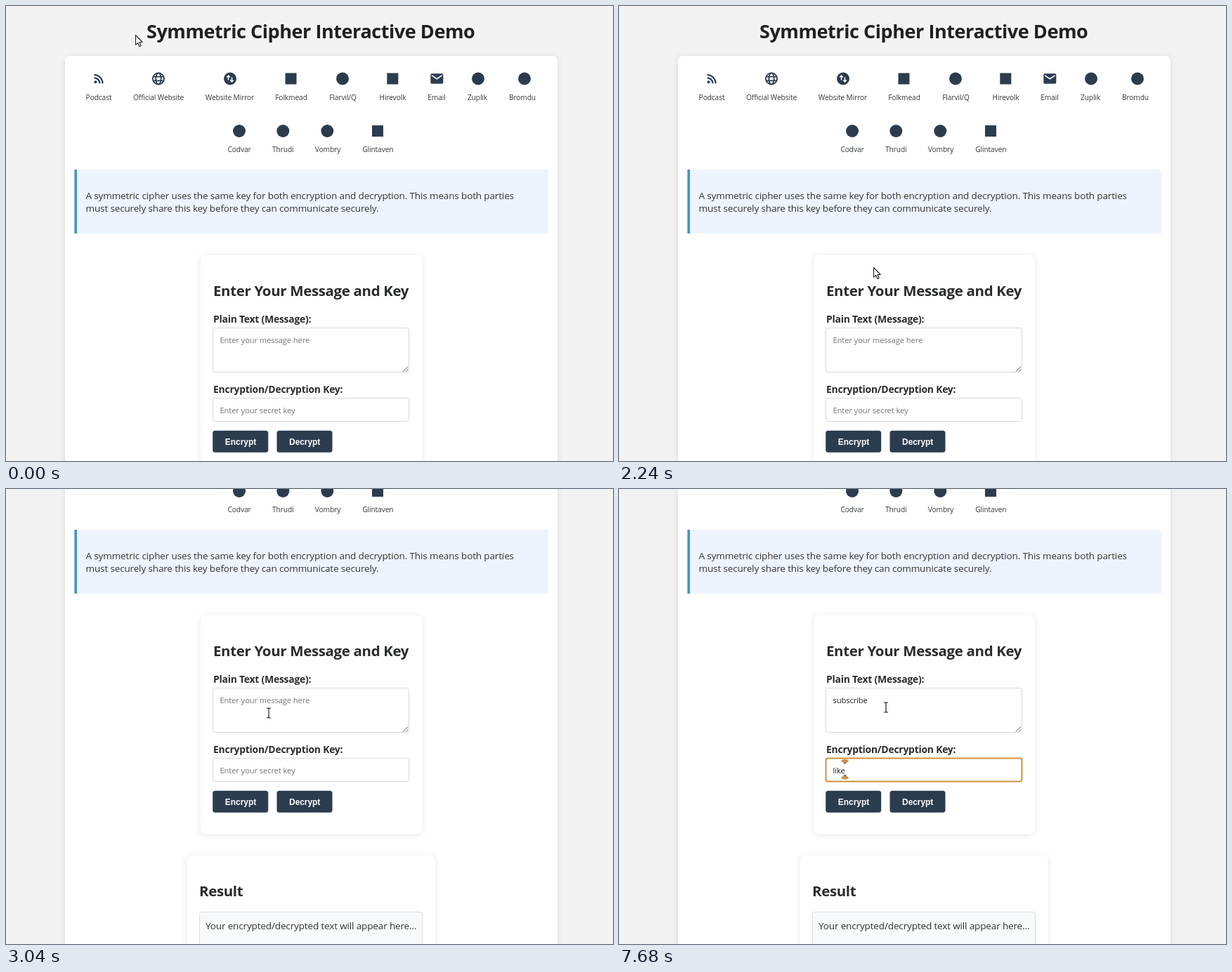
Write an HTML page that moves like this. It is 864 by 648 pixels and loops after 8 s.

```html
<!DOCTYPE html>
<html lang="en">
<head>
<meta charset="utf-8">
<title>Symmetric Cipher Interactive Demo</title>
<style>
  html, body { margin: 0; width: 100%; height: 100%; overflow: hidden; background: #f3f3f3; }
  svg { display: block; }
  text { font-family: "Open Sans", "Noto Sans", sans-serif; letter-spacing: -.01em; fill: #333; white-space: pre; }
  .title, .head, .label { font-weight: 700; letter-spacing: -.016em; fill: #2a2b2d; }
  .title { font-size: 27px; fill: #1f2023; }
  .head { font-size: 20.45px; }
  .label { font-size: 13.9px; }
  .body { font-size: 13.5px; }
  .tiny { font-size: 10.2px; text-anchor: middle; fill: #33383d; }
  .field { font-size: 11.2px; fill: #1c1c1c; }
  .hint { fill: #757575; }
  .button { font: 700 11.9px "Liberation Sans", Arial, sans-serif; letter-spacing: 0; fill: #fff; text-anchor: middle; }
  .ink { fill: #2c3c4f; }
  .line { fill: none; stroke: #2c3c4f; }
  .card { fill: #fff; filter: drop-shadow(0 1px 4px rgba(0, 0, 0, .1)); }
</style>
</head>
<body>
<svg id="stage" width="864" height="648" viewBox="0 0 864 648">
  <defs><clipPath id="picked"><rect id="pickedBox" x="200" y="15" height="37.5"/></clipPath></defs>
  <g id="page">
    <text class="title" x="200" y="45.5">Symmetric Cipher Interactive Demo</text>
    <g clip-path="url(#picked)">
      <rect x="200" y="15" width="469" height="37.5" fill="#4660ca"/>
      <text class="title" x="200" y="45.5" style="fill:#fff">Symmetric Cipher Interactive Demo</text>
    </g>

    <rect class="card" x="84" y="71" width="701" height="900" rx="7"/>
    <g id="links"></g>

    <rect x="97.4" y="233" width="674.6" height="91" rx="2" fill="#edf4fd"/>
    <rect x="97.4" y="233" width="3.6" height="91" fill="#4a90c8"/>
    <text class="body" x="113.5" y="275">A symmetric cipher uses the same key for both encryption and decryption. This means both parties</text>
    <text class="body" x="113.5" y="293">must securely share this key before they can communicate securely.</text>

    <rect class="card" x="277" y="355" width="315" height="311.5" rx="7"/>
    <text class="head" x="295" y="412.5">Enter Your Message and Key</text>
    <text class="label" x="295" y="450.5">Plain Text (Message):</text>
    <rect id="messageBox" x="294.5" y="458.5" width="279" height="63" rx="3" fill="#fff"/>
    <path d="M565 520.5l7-7M569.5 520.5l2.5-2.5" stroke="#555" fill="none"/>
    <text id="messageHint" class="field hint" x="304.5" y="480">Enter your message here</text>
    <text id="messageText" class="field" x="304.5" y="480"></text>

    <text class="label" x="295" y="550.5">Encryption/Decryption Key:</text>
    <rect id="keyBox" x="294.5" y="558.5" width="279" height="33" rx="3" fill="#fff"/>
    <text id="keyHint" class="field hint" x="304.5" y="580">Enter your secret key</text>
    <text id="keyText" class="field" x="304.5" y="580"></text>

    <rect class="ink" x="294.2" y="604.7" width="79" height="31" rx="3.5"/>
    <text class="button" x="334" y="624.5">Encrypt</text>
    <rect class="ink" x="385.5" y="604.7" width="79" height="31" rx="3.5"/>
    <text class="button" x="425.2" y="624.5">Decrypt</text>

    <rect class="card" x="257.5" y="697" width="353.5" height="220" rx="7"/>
    <text class="head" x="275" y="755">Result</text>
    <rect x="275.5" y="777.5" width="317" height="90" rx="3" fill="#f8f9fa" stroke="#d9dcdf"/>
    <text class="body" x="284" y="802">Your encrypted/decrypted text will appear here...</text>

    <rect id="caret" width="1" height="15" fill="#111"/>
    <g id="marker">
      <path d="M-3-16.2h6L0-13zM-3 4.4h6L0 1.2z" fill="#66625d"/>
      <ellipse cy="-17.8" rx="5" ry="2.3" fill="#cb9050"/>
      <ellipse cy="6.2" rx="5" ry="2.3" fill="#cb9050"/>
    </g>
  </g>
  <path id="arrow" d="M.5.5V14.3l3.2-2.9 2.2 5.1 2.2-1L5.9 10.5h4.3z" fill="#fff" stroke="#222" stroke-width="1.1" stroke-linejoin="round"/>
  <path id="beam" d="M-3-7h2.2L0-6.2.8-7H3M-3 7h2.2L0 6.2.8 7H3M0-6.5v13" fill="none" stroke="#222" stroke-width="1.2"/>
</svg>
<script>
const LOOP = 8000, STEP = 80, TEXT_X = 304.5;
const el = id => document.getElementById(id);
const show = (id, on) => el(id).setAttribute('visibility', on ? 'visible' : 'hidden');
const set = (id, attrs) => { for (const k in attrs) el(id).setAttribute(k, attrs[k]); };
const clamp = (v, a, b) => Math.min(b, Math.max(a, v));
const ease = p => { p = clamp(p, 0, 1); return p * p * (3 - 2 * p); };

const icons = {
  feed: '<circle class="ink" cx="-4.5" cy="4.7" r="2"/><path class="line" stroke-width="2.2" d="M-6.5-1.2A7.9 7.9 0 0 1 1.4 6.7M-6.5-5.3A12 12 0 0 1 5.5 6.7"/>',
  globe: '<g class="line" stroke-width="1.8"><circle r="8.1"/><ellipse rx="3.7" ry="8.1"/><path d="M-7.6-2.8H7.6M-7.6 2.8H7.6"/></g>',
  swap: '<circle class="ink" r="9"/><path d="M-2.5 2v-6M-4.8-2l2.3-2.5L-.2-2M2.5-2v6M.2 2l2.3 2.5L4.8 2" fill="none" stroke="#fff" stroke-width="1.5"/>',
  mail: '<rect class="ink" x="-9" y="-7.3" width="18" height="14.6" rx="1.8"/><path d="M-7.3-4.6L0 .2l7.3-4.8" fill="none" stroke="#fff" stroke-width="1.7"/>',
  square: '<rect class="ink" x="-8" y="-8" width="16" height="16"/>',
  circle: '<circle class="ink" r="9"/>'
};

// icon, icon x, label, label x
const rows = [
  [103.5, [
    ['feed', 132, 'Podcast', 132], ['globe', 217, 'Official Website', 217],
    ['swap', 319, 'Website Mirror', 318.5], ['square', 405.5, 'Folkmead', 406],
    ['circle', 479, 'Flarvil/Q', 479.5], ['square', 550.3, 'Hirevolk', 550.5],
    ['mail', 613.3, 'Email', 613], ['circle', 672, 'Zuplik', 671], ['circle', 738, 'Bromdu', 735]
  ]],
  [178, [
    ['circle', 332, 'Codvar', 332], ['circle', 394.3, 'Thrudi', 394.3],
    ['circle', 457.3, 'Vombry', 458], ['square', 529, 'Glintaven', 529.3]
  ]]
];
el('links').innerHTML = rows.map(([y, items]) => items.map(([icon, x, label, mid]) =>
  `<g transform="translate(${x} ${y})">${icons[icon]}</g><text class="tiny" x="${mid}" y="${y + 30.3}">${label}</text>`
).join('')).join('');

// time, x, y of the pointer's hot spot
const path = [
  [0, 184, 41], [160, 199, 38], [640, 688, 35], [1680, 688, 35], [2240, 362, 372],
  [2960, 362, 372], [3040, 374, 319], [3200, 380, 311], [LOOP, 380, 311]
];
// time, letters typed
const typing = [[4800, 2], [5840, 4], [5920, 6], [6080, 8], [6160, 9]];

function pointerAt(t) {
  const i = path.findIndex((p, n) => n + 1 < path.length && t < path[n + 1][0]);
  const [t0, x0, y0] = path[i], [t1, x1, y1] = path[i + 1];
  const p = ease((t - t0) / (t1 - t0));
  return [x0 + (x1 - x0) * p, y0 + (y1 - y0) * p];
}

function fill(name, word, focused) {
  el(name + 'Text').textContent = word;
  show(name + 'Hint', !word);
  set(name + 'Box', { stroke: focused ? '#cd9138' : '#d6d9dc', 'stroke-width': focused ? 2 : 1 });
}

function draw(t) {
  const scroll = Math.round(175 * ease((t - 2244) / 325));
  set('page', { transform: `translate(0 ${-scroll})` });

  const [x, y] = pointerAt(t);
  const beam = (t >= 160 && t < 640) || t >= 3040;
  const place = { transform: `translate(${x} ${y})` };
  set('arrow', place);
  set('beam', place);
  show('arrow', !beam);
  show('beam', beam);

  const selecting = t >= 160 && t < 1920;
  set('pickedBox', { width: selecting ? clamp(t < 640 ? x : 669, 200, 669) - 200 : 0 });

  const onKey = t >= 6800, onMessage = t >= 3200 && !onKey;
  const count = typing.reduce((n, [at, letters]) => t >= at ? letters : n, 0);
  fill('message', 'subscribe'.slice(0, count), onMessage);
  fill('key', t >= 7520 ? 'like' : '', onKey);

  // the marker trails the caret by one letter while typing
  const text = el(onKey ? 'keyText' : 'messageText');
  const length = text.textContent.length;
  const lag = onMessage && t >= 4800 && t < 6160 ? 1 : 0;
  const endOf = n => TEXT_X + (n > 0 ? text.getSubStringLength(0, n) : 0);
  const base = onKey ? 580 : 480;
  const blink = (t >= 3760 && t < 4800) || t >= 7680;
  set('caret', { x: Math.round(endOf(length) - .5), y: base - 13 });
  set('marker', { transform: `translate(${endOf(length - lag)} ${base})` });
  show('caret', (onMessage || onKey) && !blink);
  show('marker', onMessage || onKey);
}

let start = null;
function tick(now) {
  if (start === null) start = now;
  draw(Math.floor((now - start) % LOOP / STEP) * STEP);
  requestAnimationFrame(tick);
}
draw(0);
requestAnimationFrame(tick);
</script>
</body>
</html>
```
